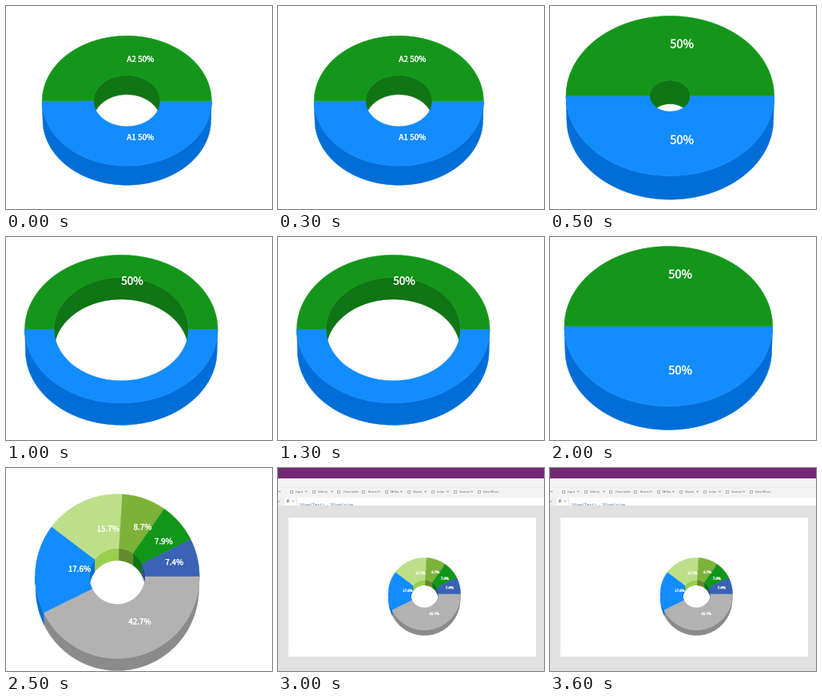
A matplotlib script for the animation above (4000 ms loop, 333 by 254 pixels).

```python
import colorsys

import numpy as np
import matplotlib.pyplot as plt
from matplotlib.animation import FuncAnimation
from matplotlib.colors import to_rgb
from matplotlib.patches import Polygon, Rectangle
from matplotlib.patheffects import withStroke

W, H, DPI = 333, 254, 100
PT = 72 / DPI  # points per pixel
LABEL_RADIUS = 0.6

plt.rcParams["font.family"] = "Noto Sans CJK JP"
plt.rcParams["toolbar"] = "None"
fig = plt.figure(figsize=(W / DPI, H / DPI), dpi=DPI, facecolor="white")
ax = fig.add_axes([0, 0, 1, 1])

# share and colour, clockwise from the right
HALVES = [(50, "#138cff"), (50, "#14961a")]
SIX = [(42.7, "#b2b2b2"), (17.6, "#138cff"), (15.7, "#bddf8a"),
       (8.7, "#7db239"), (7.9, "#12961a"), (7.4, "#3a62b5")]
MENU = ["Input", "Gallery", "Data table", "Forms", "Media",
        "Charts", "Icons", "Custom", "Idea Mixer"]
PLAIN_ITEMS = {"Data table", "Idea Mixer"}


def darker(color):
    hue, light, sat = colorsys.rgb_to_hls(*to_rgb(color))
    return colorsys.hls_to_rgb(hue, light * 0.78, sat)


def rect(x, y, w, h, color):
    ax.add_patch(Rectangle((x, y), w, h, fc=color, lw=0, zorder=2))


def shape(points, color):
    ax.add_patch(Polygon(points, fc=color, ec=color, lw=0.3, zorder=2))


def text(x, y, s, px, color="white", **style):
    return ax.text(x, y, s, size=px * PT, color=color, va="baseline", zorder=2, **style)


def line(xs, ys, color):
    ax.plot(xs, ys, color=color, lw=0.6 * PT, zorder=2)


def chevron(x, y):
    line([x - 1.2, x, x + 1.2], [y - 0.6, y + 0.6, y - 0.6], "#777777")


def arc(center, radii, a, b):
    t = np.linspace(a, b, 90)
    return np.c_[center[0] + radii[0] * np.cos(t), center[1] + radii[1] * np.sin(t)]


def donut(x, y, radius, hole, slices, tilt, depth, font, prefix=""):
    """Extruded ring; hole, depth and font are fractions of the radius."""
    center, base = (x, y), (x, y + depth * radius)
    outer = np.array([radius, radius * tilt])
    inner = outer * hole
    ends = np.cumsum([0] + [share for share, _ in slices]) * 2 * np.pi / 100
    spans = list(zip(ends[:-1], ends[1:], slices))

    def wall(radii, base_radii, lo, hi):
        for a, b, (_, color) in spans:
            a, b = max(a, lo), min(b, hi)
            if b - a > 1e-6:
                top, bottom = arc(center, radii, a, b), arc(base, base_radii, a, b)
                shape(np.r_[top, bottom[::-1]], darker(color))

    wall(outer, outer * [0.993, 1], 0, np.pi)
    if hole:
        wall(inner, inner, np.pi, 2 * np.pi)
    for a, b, (_, color) in spans:
        shape(np.r_[arc(center, outer, a, b), arc(center, inner, b, a)], color)

    for n, (a, b, (share, _)) in enumerate(spans, 1):
        spot = arc(center, outer * LABEL_RADIUS, (a + b) / 2, b)[0]
        name = f"{prefix}{n} " if prefix else ""
        label = text(*spot, f"{name}{share}%", font * radius)
        label.set_path_effects([withStroke(linewidth=0.25 * PT, foreground="white")])


def halves(x, y, radius, hole, font=0.112, prefix=""):
    donut(x, y, radius, hole, HALVES, 0.768, 0.227, font, prefix)


def six(x, y, radius, hole):
    donut(x, y, radius, hole, SIX, 1, 0.148, 0.096)


def menu_bar():
    x = 16
    chevron(2, 29.5)
    for name in MENU:
        ax.add_patch(Rectangle((x - 1.5, 28), 3, 3, fc="none", ec="#888888",
                               lw=0.6 * PT, zorder=2))
        text(x + 6, 31, name, 4, "#666666")
        has_arrow = name not in PLAIN_ITEMS
        if has_arrow:
            chevron(x + 9.5 + 2 * len(name), 29.5)
        x += 15.2 + 1.6 * len(name) + 5 * has_arrow


def formula_bar():
    rect(0, 37, W, 9.5, "white")
    rect(0, 37, 7.5, 9.5, "#eeeeee")
    text(0, 43.5, "=", 4.5, "#666666")
    text(10.5, 43.5, "fx", 6, "#444444", style="italic", family="Liberation Serif")
    chevron(19, 41.5)
    line([23, 23], [37, 46], "#d0d0d0")
    text(25, 47.6, "'View(Text), 'Ring(size", 5, "#3b6ea8", family="Liberation Mono")


def editor():
    rect(0, 0, W, 13, "#742774")
    rect(0, 13, W, 24, "#f3f3f3")
    line([0, W], [24, 24], "#e4e4e4")
    menu_bar()
    formula_bar()
    rect(0, 46.5, W, H - 46.5, "#e1e1e1")
    rect(13, 61.5, 309.5, 174, "white")
    six(183.3, 157.5, 45.2, 0.385)


SCENES = [
    lambda: halves(151.3, 118.7, 106, 0.393, font=0.094, prefix="A"),
    lambda: halves(150.3, 112.5, 130.3, 0.195),
    lambda: halves(144.3, 115.2, 120.7, 0.697),
    lambda: halves(144.3, 112.5, 91.3, 0.493),
    lambda: halves(148.3, 111.7, 130.3, 0),
    lambda: six(139.3, 135.5, 102.8, 0.34),
    editor,
]


def draw(i):
    ax.clear()
    ax.set(xlim=(0, W), ylim=(H, 0))
    ax.axis("off")
    SCENES[min(i, len(SCENES) - 1)]()
    return []


# the last scene holds for two steps
anim = FuncAnimation(fig, draw, frames=len(SCENES) + 1, init_func=lambda: draw(0),
                     interval=500, repeat=True, repeat_delay=0)
plt.show()
```
